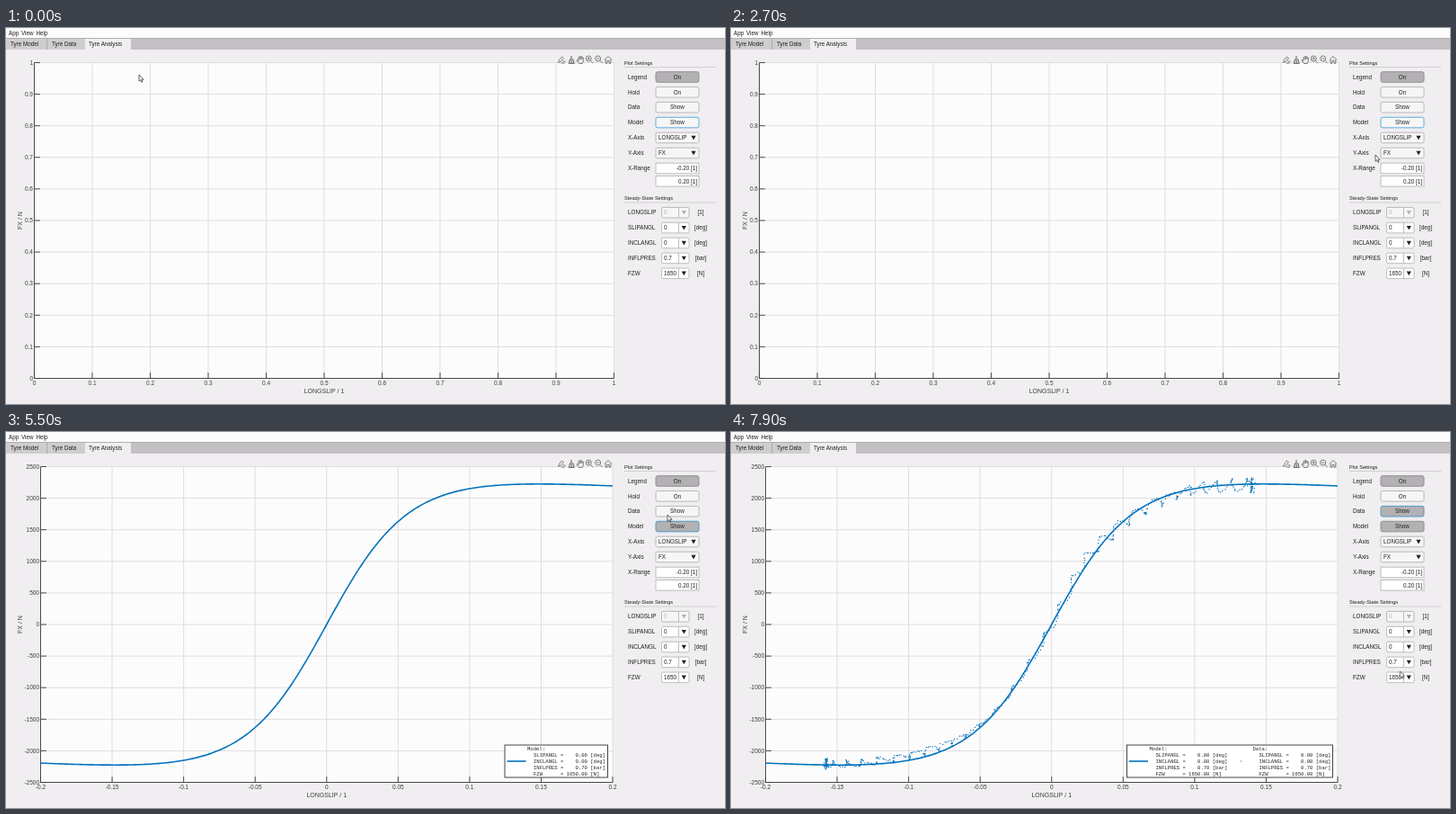
These frames come from a looping animation (800 by 418 pixels, 8 s). An HTML page:

```html
<!DOCTYPE html>
<html lang="en">
<head>
<meta charset="utf-8">
<title>Tyre Analysis</title>
<style>
html, body { margin: 0; width: 100%; height: 100%; overflow: hidden; background: #f0eef0; }
svg { display: block; width: 800px; height: 418px; font: 6.3px "Liberation Sans", Arial, sans-serif; fill: #222; }
.tick { font-size: 6.5px; fill: #404040; }
.label { font-size: 7px; fill: #404040; }
.head { font-size: 5.6px; }
.mono { font: 5.55px "Liberation Mono", monospace; white-space: pre; }
.off { fill: #b4b2b4; }
.btn { fill: #f7f6f7; stroke: #b3b1b3; }
.on { fill: #b3b1b3; stroke: #8c8a8c; }
.box { fill: #fff; stroke: #b9b7b9; }
.icon { fill: none; stroke: #747274; stroke-width: .9; }

#empty, #filled, #legendModel, #data, #modelBtn, #dataBtn, #arrow, #beam {
  animation: 8s step-end infinite;
}
#empty { animation-name: empty; }
#filled { animation-name: filled; }
#legendModel { animation-name: legend; }
#data { animation-name: data; }
#modelBtn { animation-name: model-press; }
#dataBtn { animation-name: data-press; }
#arrow { animation-name: arrow; }
#beam { animation-name: beam; }
#cursor { animation: move 8s infinite; }

@keyframes empty { 0% { opacity: 1 } 62.5%, 100% { opacity: 0 } }
@keyframes filled { 0% { opacity: 0 } 62.5%, 100% { opacity: 1 } }
@keyframes legend { 0% { opacity: 1 } 82.5%, 100% { opacity: 0 } }
@keyframes data { 0% { opacity: 0 } 82.5%, 100% { opacity: 1 } }
@keyframes model-press {
  0% { fill: #f7f6f7; stroke: #4da6dc }
  56.25% { fill: #b3b1b3; stroke: #3f93c8 }
  73.75%, 100% { fill: #b3b1b3; stroke: #8c8a8c }
}
@keyframes data-press {
  0% { fill: #f7f6f7; stroke: #b3b1b3 }
  73.75%, 100% { fill: #b3b1b3; stroke: #3f93c8 }
}
@keyframes arrow { 0% { opacity: 1 } 80% { opacity: 0 } 82.5%, 100% { opacity: 1 } }
@keyframes beam { 0% { opacity: 0 } 80% { opacity: 1 } 82.5%, 100% { opacity: 0 } }
/* the pointer is sampled every 100 ms */
@keyframes move {
  0% { transform: translate(148px, 52px); animation-timing-function: step-end }
  1.25% { transform: translate(310px, 92px); animation-timing-function: steps(2) }
  3.75% { transform: translate(753px, 221px); animation-timing-function: step-end }
  6.25% { transform: translate(754px, 236px); animation-timing-function: steps(2) }
  8.75% { transform: translate(758px, 300px); animation-timing-function: steps(4) }
  12.5% { transform: translate(743px, 233px); animation-timing-function: step-end }
  15% { transform: translate(735px, 215px); animation-timing-function: steps(2) }
  17.5% { transform: translate(710px, 166px); animation-timing-function: step-end }
  27.5% { transform: translate(710px, 164px); animation-timing-function: steps(5) }
  33.75% { transform: translate(717px, 141px); animation-timing-function: steps(3) }
  37.5% { transform: translate(721px, 128px); animation-timing-function: steps(6) }
  45% { transform: translate(737px, 107px); animation-timing-function: step-end }
  62.5% { transform: translate(737px, 106px); animation-timing-function: steps(5) }
  68.75% { transform: translate(736px, 92px); animation-timing-function: steps(3) }
  72.5% { transform: translate(736px, 89px); animation-timing-function: step-end }
  76.25% { transform: translate(737px, 105px); animation-timing-function: steps(4) }
  81.25% { transform: translate(738.5px, 180px); animation-timing-function: steps(3) }
  85% { transform: translate(741px, 220px); animation-timing-function: steps(10) }
  97.5% { transform: translate(744px, 264px); animation-timing-function: step-end }
  98.75%, 100% { transform: translate(744.5px, 266px) }
}
</style>
</head>
<body>
<svg id="stage" viewBox="0 0 800 418">
  <rect width="800" height="418" fill="#f0eef0"/>
  <rect width="800" height="11" fill="#fdfcfd"/>
  <rect y="11" width="800" height="13" fill="#c3c1c3"/>
  <path d="M0 12H45.5V24H0ZM46.5 12H88V24H46.5Z" fill="#cfcdcf"/>
  <path d="M45.5 12V24M0 11.5H800" stroke="#b0aeb0" fill="none"/>
  <rect x="88" y="12" width="51" height="12.5" fill="#f0eef0"/>
  <g id="menu"></g>
  <g id="empty"></g>
  <g id="filled">
    <g id="axes"></g>
    <path id="curve" fill="none" stroke="#0072bd" stroke-width="1.6"/>
    <g id="legendModel"></g>
    <g id="data"></g>
  </g>
  <g class="icon">
    <path d="M614.5 38.5 615.5 35.5 618.5 32 620.5 33.5 617.5 37ZM617.5 39H622M619.5 37H622.5"/>
    <path d="M629 31V35M627.5 35H631L632 39.5H626.5ZM629.3 36V39" stroke-width="1.2"/>
    <path d="M637.5 39.5 635 35.8 636.5 35.5 637 36.5V32.5M637 32.5H638.2V35M638.2 31.5H639.6V35M639.6 32H641V35M641 33H642.3V37L641.2 39.5H637.5"/>
    <path id="lens" d="M645.2 34a3 3 0 1 0 6 0a3 3 0 1 0-6 0M650.4 36.3 653.2 39.2M646.6 34H649.8"/>
    <use href="#lens" x="10.5"/>
    <path d="M648.2 32.4V35.6"/>
    <path d="M665.8 35.5 670 31.5 674.2 35.5M667.2 35V39.3H669V36.3H671V39.3H672.8V35"/>
  </g>
  <g id="panel"></g>
  <g id="cursor">
    <path id="arrow" d="M0 0V7.2L1.7 5.8 2.9 8.3 4 7.8 2.9 5.3H5Z" fill="#fff" stroke="#333" stroke-width=".75"/>
    <path id="beam" d="M-1.5-3.5H1.5M0-3.5V3.5M-1.5 3.5H1.5" fill="none" stroke="#333" stroke-width=".8"/>
  </g>
</svg>
<script>
const $ = id => document.getElementById(id);

function add(parent, tag, attrs, content) {
  const el = document.createElementNS("http://www.w3.org/2000/svg", tag);
  for (const key in attrs) el.setAttribute(key, attrs[key]);
  if (content !== undefined) el.textContent = content;
  parent.appendChild(el);
  return el;
}
// y is the middle of the line of text
const text = (parent, x, y, content, anchor = "start", cls = "") =>
  add(parent, "text", { x, y: y + 2.2, "text-anchor": anchor, class: cls }, content);
const box = (parent, x, y, width, height, cls, rx = 0) =>
  add(parent, "rect", { x, y, width, height, class: cls, rx, "stroke-width": .9 });
const line = (parent, d, stroke, width = 1) =>
  add(parent, "path", { d, stroke, fill: "none", "stroke-width": width });

const TOP = 38.5, BOTTOM = 389.5;

function drawAxes(parent, left, right, xTicks, yTicks, title) {
  const h = BOTTOM - TOP, w = right - left;
  add(parent, "rect", { x: left, y: TOP, width: w, height: h, fill: "#fdfcfd" });
  let grid = "", marks = `M${left} ${TOP}V${BOTTOM}H${right}`;
  xTicks.forEach((tick, i) => {
    const x = left + w * i / (xTicks.length - 1);
    grid += `M${x} ${TOP}V${BOTTOM}`;
    marks += `M${x} ${BOTTOM}v-6.4`;
    text(parent, x, 395, tick, "middle", "tick");
  });
  yTicks.forEach((tick, i) => {
    const y = BOTTOM - h * i / (yTicks.length - 1);
    grid += `M${left} ${y}H${right}`;
    marks += `M${left} ${y}h6.4`;
    text(parent, left - 1.5, y, tick, "end", "tick");
  });
  line(parent, grid, "#dfdddf");
  line(parent, marks, "#3a3a3a", .9);
  text(parent, (left + right) / 2, 403.6, title, "middle", "label");
  add(parent, "text", { transform: "translate(18 214) rotate(-90)", "text-anchor": "middle", class: "label" }, "FX / N");
}

const ticks = (n, fn) => Array.from({ length: n }, (_, i) => String(fn(i)));
const tenths = ticks(11, i => i / 10);
drawAxes($("empty"), 31.5, 676.5, tenths, tenths, "LONGSLIP / 1");
drawAxes($("axes"), 38.5, 675, ticks(9, i => (i * 5 - 20) / 100), ticks(11, i => i * 500 - 2500), "LONGSLIP / 1");

// tyre model: magic formula
const force = slip => 2225 * Math.sin(1.45 * Math.atan(12.75 * slip));
const toX = slip => 356.75 + slip * 636.5 / .4;
const toY = f => 214 - f * 351 / 5000;
$("curve").setAttribute("d", "M" + ticks(201, i => {
  const slip = (i - 100) / 500;
  return toX(slip).toFixed(2) + " " + toY(force(slip)).toFixed(2);
}).join("L"));

// measured data: loops around the model, with a cluster at each end
let seed = 7;
const rnd = () => (seed = seed * 16807 % 2147483647) / 2147483647;
const spread = r => (rnd() + rnd() - 1) * r;
const bump = (x, mid, width) => Math.exp(-(((x - mid) / width) ** 2));
let dots = "";
const dot = (x, y) => dots += `M${x.toFixed(1)} ${y.toFixed(1)}h1.2`;
for (let i = 0; i < 430; i++) {
  const slip = -.158 + .298 * i / 430;
  const phase = i * .42 + Math.sin(i * .05);
  const amp = slip > .03 ? 6 : 3.2;
  const bias = -6 * bump(slip, -.085, .045) - 9 * bump(slip, .022, .012) + 4 * bump(slip, .07, .025);
  dot(toX(slip) + 3 * Math.sin(phase) + spread(1),
      toY(force(slip)) + bias + amp * Math.cos(phase * .93) + spread(2));
}
for (let i = 0; i < 45; i++) {
  dot(105.5 + spread(i % 3 ? 1.5 : 4), 368.5 + spread(7));
  dot(578.5 + spread(i % 3 ? 1.5 : 5), 59 + spread(10));
}
line($("data"), dots, "#0072bd", 1.2);

const settings = [["SLIPANGL", "0.00", "deg"], ["INCLANGL", "0.00", "deg"], ["INFLPRES", "0.70", "bar"], ["FZW", "1650.00", "N"]];
function legendColumn(parent, x, title) {
  text(parent, x, 352, title, "start", "mono");
  settings.forEach(([name, value, unit], i) =>
    text(parent, x + 7, 359 + 7 * i, `${name.padEnd(8)} = ${value.padStart(7)} [${unit}]`, "start", "mono"));
}
function drawLegend(parent, left, titles) {
  add(parent, "rect", { x: left, y: 348, width: 669.5 - left, height: 36, fill: "#fff", stroke: "#333", "stroke-width": .9 });
  line(parent, `M${left + 2.5} 366h21`, "#0072bd", 1.6);
  titles.forEach((title, i) => legendColumn(parent, left + 25 + 115 * i, title));
}
drawLegend($("legendModel"), 555, ["Model:"]);
drawLegend($("data"), 440.5, ["Model:", "Data:"]);
line($("data"), "M567 366h1.2", "#0072bd", 1.2);

const menu = $("menu");
[[3, "App"], [17, "View"], [33.5, "Help"]].forEach(([x, s]) => text(menu, x, 5.6, s));
[[5, "Tyre Model"], [51, "Tyre Data"], [92, "Tyre Analysis"]].forEach(([x, s]) => text(menu, x, 18, s));

const panel = $("panel");
const caret = (x, y, cls = "") =>
  add(panel, "path", { d: `M${x - 2.6} ${y - 2.2}h5.2l-2.6 4.6Z`, class: cls });
function heading(y, s) {
  text(panel, 688, y, s, "start", "head");
  line(panel, `M688 ${y + 5}H790`, "#d0ced0");
}

heading(38.5, "Plot Settings");
[["Legend", "On"], ["Hold", "On"], ["Data", "Show"], ["Model", "Show"]].forEach(([name, state], i) => {
  const y = 54.5 + 16.85 * i;
  text(panel, 692, y, name);
  const button = box(panel, 723, y - 5.8, 48, 11.6, i ? "btn" : "on", 2);
  if (i > 1) button.id = name.toLowerCase() + "Btn";
  text(panel, 747, y, state, "middle");
});
[["X-Axis", "LONGSLIP"], ["Y-Axis", "FX"]].forEach(([name, value], i) => {
  const y = 122 + 17 * i;
  text(panel, 692, y, name);
  box(panel, 723, y - 5.8, 48, 11.6, "btn", 1.5);
  text(panel, 726, y, value);
  caret(765, y);
});
text(panel, 692, 155.5, "X-Range");
["-0.20 [1]", "0.20 [1]"].forEach((value, i) => {
  const y = 156 + 14.3 * i;
  box(panel, 723, y - 5.8, 48, 11.6, "box");
  text(panel, 769, y, value, "end");
});

heading(189, "Steady-State Settings");
[["LONGSLIP", "0", "1"], ["SLIPANGL", "0", "deg"], ["INCLANGL", "0", "deg"], ["INFLPRES", "0.7", "bar"], ["FZW", "1650", "N"]].forEach(([name, value, unit], i) => {
  const y = 205.2 + 16.9 * i, cls = i ? "" : "off";
  text(panel, 692, y, name);
  box(panel, 729.5, y - 5.8, 30.5, 11.6, i ? "box" : "btn", 1.5);
  line(panel, `M748.5 ${y - 5.8}v11.6`, "#b9b7b9", .9);
  text(panel, 732, y, value, "start", cls);
  caret(754.3, y, cls);
  text(panel, 773, y, `[${unit}]`, "middle");
});
</script>
</body>
</html>
```
